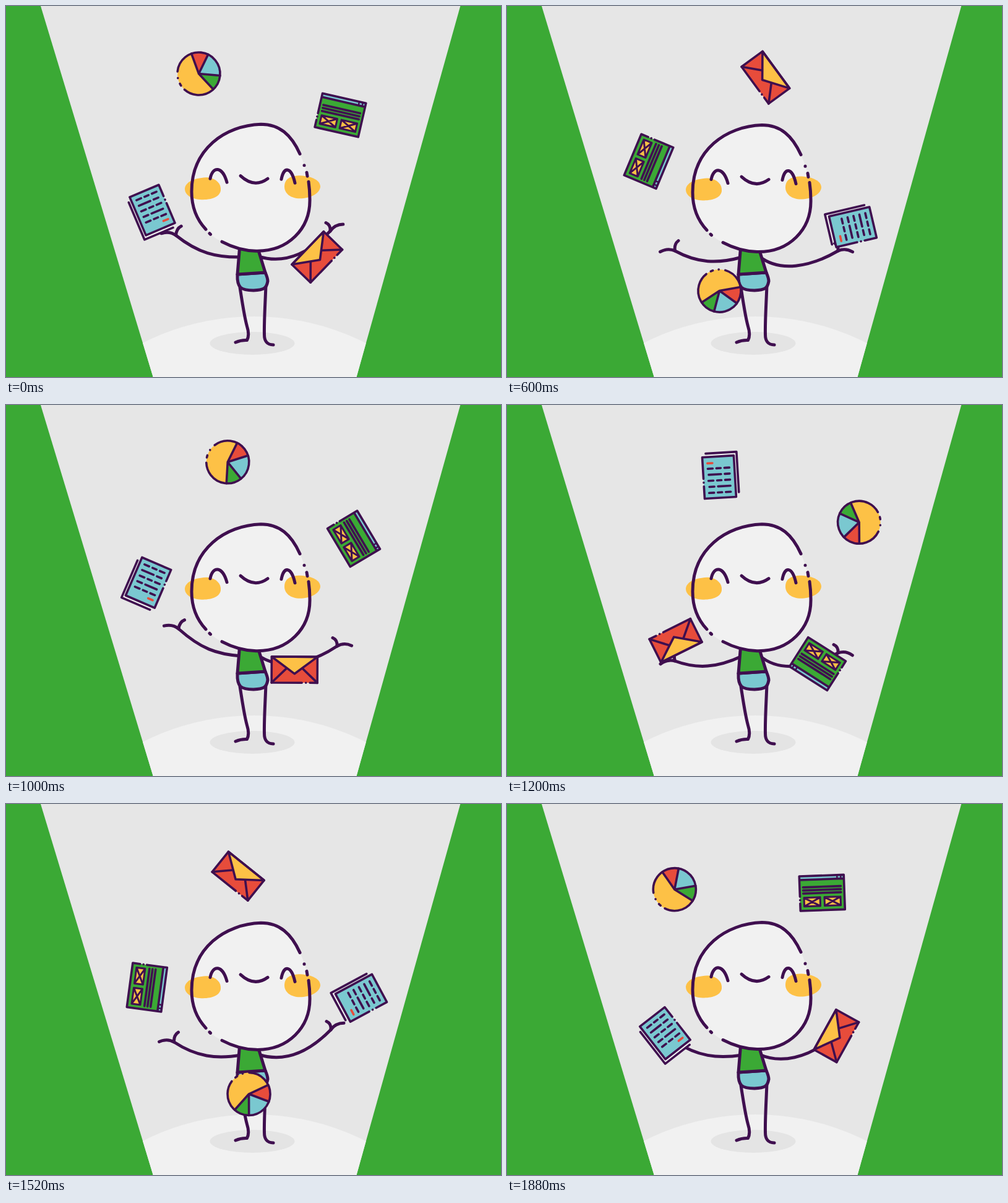
An HTML page for the animation above (1.92 s loop, 800x600 px).

```html
<!DOCTYPE html>
<html lang="en">
<head>
<meta charset="utf-8">
<title>Juggler</title>
<style>
html, body { margin: 0; width: 100%; height: 100%; overflow: hidden; background: #3ba935; }
svg { display: block; width: 100%; height: 100%; }
.ink { stroke: #3f0f4f; fill: none; stroke-linecap: round; stroke-linejoin: round; }
.limb { stroke-width: 5; }
.thin { stroke-width: 3.6; }
.green { fill: #3ba935; }
.blue { fill: #7ac8d0; }
.yellow { fill: #fdc146; }
.red { fill: #e74c3b; }
.pale { fill: #f1f1f1; }
</style>
</head>
<body>
<svg viewBox="0 0 800 600">
  <clipPath id="beam"><path d="M56,0H734.300L566.500,600H237.700Z"/></clipPath>
  <rect width="800" height="600" class="green"/>
  <g clip-path="url(#beam)">
    <rect width="800" height="600" fill="#e6e6e6"/>
    <circle cx="401" cy="902" r="400" class="pale"/>
  </g>
  <ellipse cx="398" cy="545.5" rx="68.5" ry="18.5" fill="#e4e4e4"/>

  <g class="ink limb">
    <path d="M378,455C382,480 385,502 389.500,518Q394,532 389.500,540.500Q380,540 371,544"/>
    <path d="M420,452C419,480 417,510 417.500,530Q417,548 432,548"/>
    <path id="armL"/>
    <path id="handL" d="M-24,0Q-11,-6 0,0M0,0Q-1,-11 6.500,-16"/>
    <path id="armR"/>
    <path id="handR" d="M0,0Q11,-7 23.500,-2"/>
    <path id="thumbR" d="M0,0Q1,-10 -7,-13.500"/>
    <path class="blue" d="M374,434L419,431Q423,440 423,445C421,457 417,459 400,460C380,460 373,456 374,434Z"/>
    <path class="green" d="M377.500,392H407L419,431L374,434Z"/>
  </g>

  <g id="head">
    <path class="pale" d="M475,239C461,208 442,191 412,191C354,193 300,231 300,300C300,325 309,346 323,361Q334,374 349,381C366,390 383,395.500 404,396C456,397 492,360 491,312Q491,298 489,284Q484,258 475,239Z"/>
    <path class="yellow" d="M289,295C290,283 308,277 326,277C340,279 348,287 347,298C345,310 330,313 316,313C300,312 289,306 289,295Z"/>
    <path class="yellow" d="M450,292C450,279 460,274 476,274C495,275 508,282 508,292C507,304 490,311 475,311C460,311 450,303 450,292Z"/>
    <g class="ink limb">
      <path d="M475,239C461,208 442,191 412,191C354,193 300,231 300,300C300,325 309,346 323,361M329,367.500l1.500,1.500M349,381C366,390 383,395.500 404,396C456,397 492,360 491,312Q491,298 489,284M487,275L486,269M482,257.500v.1"/>
      <path d="M330,279C334,258 350,259 357,285M445,280C449,259 461,259 467,286M379,274.500Q401,295 423,279"/>
    </g>
  </g>

  <g class="ink thin">
    <g id="pie"></g>
    <g id="page">
      <path class="blue" stroke="none" d="M-36,-28h72v7h-72z"/>
      <path class="green" stroke="none" d="M-36,-22h72v50h-72z"/>
      <path d="M-36,5V-28H36V28H-36V16M-36,10.500v.1M-36,-22H36"/>
      <path stroke-width="2.500" d="M25,-27V-23M31,-27V-23"/>
      <path d="M-30.500,-10H30.500M-30.500,-5H30.500M-30.500,0H30.500"/>
      <path id="boxes" class="yellow" stroke-width="3"/>
    </g>
    <g id="mail">
      <path class="red" stroke="none" d="M-37,-21h74v42h-74z"/>
      <path d="M-37,21L-12,-3M37,21L12,-3"/>
      <path class="yellow" d="M-37,-21L0,6.500L37,-21Z"/>
      <path d="M12,21H-37V-21H37V21H25M18.500,21h.1"/>
    </g>
    <g id="doc">
      <path class="pale" d="M-28,-29V36.400H22"/>
      <path class="blue" stroke="none" d="M-23.200,-36.300h51v67h-51z"/>
      <path d="M27.800,-16.500V-36.300H-23.200V30.700H27.800V-4M27.800,-10.300v.1"/>
      <path id="lines"/>
      <path style="stroke:#e74c3b" d="M12,20.500H20"/>
    </g>
  </g>
</svg>
<script>
const STEP = 40, STEPS = 48, TURN = 24;
const $ = id => document.getElementById(id);
const rad = a => a * Math.PI / 180;
const place = (id, x, y, a = 0) =>
  $(id).setAttribute('transform', `translate(${x.toFixed(2)} ${y.toFixed(2)}) rotate(${a.toFixed(2)})`);

const PIE_R = 34.5;
const polar = a => `${PIE_R * Math.cos(rad(a))},${PIE_R * Math.sin(rad(a))}`;
const slice = (color, from, to) =>
  `<path class="${color}" d="M0,0L${polar(from)}A${PIE_R},${PIE_R} 0 ${+(to - from > 180)} 1 ${polar(to)}Z" stroke="none"/>`;
$('pie').innerHTML =
  slice('yellow', 47, 250) + slice('red', 250, 296) + slice('blue', 296, 365) + slice('green', 5, 47) +
  `<path d="${[250, 296, 5, 47].map(a => `M0,0L${polar(a)}`).join('')}"/>` +
  `<circle r="${PIE_R}" pathLength="360" transform="rotate(186)" stroke-dasharray="306 14 6 16 .1 17.9"/>`;

$('boxes').setAttribute('d', [-29.5, 3.5].map(x =>
  `M${x},7h26v14h-26zl26,14m0,-14l-26,14`).join(''));

const triple = 'h8m6,0h7m6,0h8', double = 'h8m6,0h20', reversed = 'h20m6,0h8';
$('lines').setAttribute('d', [triple, reversed, triple, double, triple]
  .map((row, i) => `M-15,${-27.5 + 9.8 * i}${row}`).join(''));

// id, orbit radius, orbit angle, own tilt
const props = [
  ['pie', 190.8, -117.7, 0],
  ['page', 173.3, -36, 12.9],
  ['mail', 163.7, 51.2, -46],
  ['doc', 173.7, 161.5, -23],
];

// hand height around its rest position: [step, offset]
const leftKeys = [[0, -17], [1, -26], [6, 26], [8, -1], [11, -20], [14, -3], [15, 8], [18, 22], [23, -4], [24, -17]];
const rightKeys = [[0, -21], [1, 5], [3, 16], [6, 16], [8, 0], [11, -18], [14, -20], [15, 11], [18, 16], [23, -12], [24, -21]];

function sample(keys, n) {
  const i = keys.findIndex(k => k[0] > n);
  const [a, from] = keys[i - 1], [b, to] = keys[i];
  return from + (to - from) * (1 - Math.cos(Math.PI * (n - a) / (b - a))) / 2;
}

function drawArms(n) {
  let d = sample(leftKeys, n);
  let x = 271.5 + .011 * Math.min(d, 0) ** 2, y = 388 + d;
  $('armL').setAttribute('d',
    `M380,406C340,${414 + .42 * d} ${x + 36},${y + 36 * (.63 - .01 * d)} ${x},${y}`);
  place('handL', x, y, -.45 * d);

  d = sample(rightKeys, n);
  x = 535 - .025 * Math.min(d, 0) ** 2;
  y = 385 + d;
  $('armR').setAttribute('d',
    `M408,405C440,${425.5 + .5 * d} ${x - 45},${y + 45 * (.74 - .014 * d)} ${x},${y}`);
  place('handR', x, y, d - 2);
  place('thumbR', x, y);
}

function draw(ms) {
  const n = Math.floor(ms / STEP) % STEPS;
  const spin = 15 * n + 720 / 46 * Math.min(n, 46);
  for (const [id, r, angle, tilt] of props) {
    const a = rad(angle + 15 * n);
    place(id, 400.2 + r * Math.cos(a), 278.4 + r * Math.sin(a), tilt + spin);
  }
  drawArms(n % TURN);
  place('head', 0, .2 + 1.5 * Math.sqrt(Math.sin(Math.PI * n / STEPS)));
}

const start = performance.now();
function tick() {
  draw(performance.now() - start);
  requestAnimationFrame(tick);
}
tick();
</script>
</body>
</html>
```
